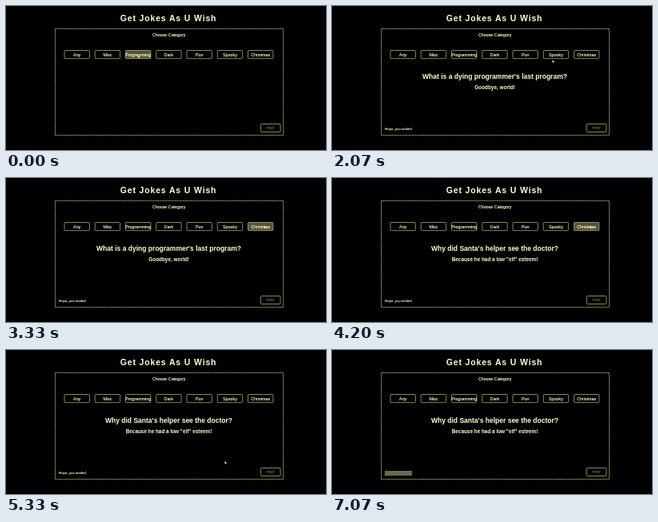
An HTML page for the animation above (7140 ms loop, 400 by 180 pixels).

```html
<!DOCTYPE html>
<html lang="en">
<head>
<meta charset="utf-8">
<title>Get Jokes As U Wish</title>
<style>
html, body { margin: 0; width: 100%; height: 100%; overflow: hidden; background: #000; }
svg { display: block; width: 400px; height: 180px; }
text { font: 5.33px "Liberation Sans", Arial, sans-serif; fill: #ffffd2; stroke: #ffffd2; stroke-width: .12; text-anchor: middle; }
.bold { font-weight: bold; stroke: none; }
#title { font-size: 10.5px; letter-spacing: .85px; text-anchor: start; }
#setup { font-size: 8.53px; }
#punch { font-size: 6.4px; }
#note { font-size: 4.35px; text-anchor: start; }
#post { font-size: 3.8px; fill: #b4b48c; stroke: none; }
.button { fill: #56523a; fill-opacity: 0; stroke: #b4b474; stroke-width: .75; }
</style>
</head>
<body>
<svg id="stage" viewBox="0 0 400 180">
  <defs>
    <pattern id="hatch" width="2" height="2" patternUnits="userSpaceOnUse">
      <path d="M0 0h1v1h1v1h-1v-1h-1z" fill="#d2d2a0"/>
    </pattern>
  </defs>
  <rect width="400" height="180"/>
  <text id="title" class="bold" x="142.7" y="19">Get Jokes As U Wish</text>
  <rect x="61.5" y="28.5" width="285" height="133" fill="none" stroke="#a8a872" stroke-dasharray="1.4 .7"/>
  <text x="203.7" y="38">Choose Category</text>
  <g id="buttons"></g>
  <rect class="button" x="318.4" y="147.5" width="24.6" height="10" rx="1"/>
  <text id="post" x="330.7" y="154">POST</text>
  <text id="setup" class="bold" x="203.5" y="91.3"></text>
  <text id="punch" class="bold" x="203.5" y="104.2"></text>
  <text id="note" x="66" y="155.2">Hope, you smiled</text>
  <rect id="selection" x="66" y="151" width="34" height="6" fill="url(#hatch)"/>
  <path id="cursor" d="M0 0v3.2l.8-.7.6 1.2.6-.3-.6-1.1h1.1z" fill="#fff"/>
</svg>
<script>
const LOOP = 7140, STEP = 1000 / 15;
const $ = id => document.getElementById(id);
const clamp = v => Math.max(0, Math.min(1, v));
const show = (id, on) => $(id).style.display = on ? '' : 'none';

$('buttons').innerHTML = ['Any', 'Misc', 'Programming', 'Dark', 'Pun', 'Spooky', 'Christmas']
  .map((name, i) => {
    const x = 73 + i * 38.25;
    return `<rect class="button" x="${x}" y="55.5" width="31.4" height="10.2" rx="1"/>` +
      `<text x="${x + 15.7}" y="62.6">${name}</text>`;
  }).join('');
const rects = $('buttons').querySelectorAll('rect');

const jokes = [
  ['', ''],
  ["What is a dying programmer's last program?", 'Goodbye, world!'],
  ["Why did Santa's helper see the doctor?", 'Because he had a low "elf" esteem!']
];

// time, x, y of the pointer tip
const path = [
  [0, 165, 61.5], [730, 165, 61.5], [930, 178.8, 70.3], [1450, 307, 102], [1560, 307, 102],
  [2030, 275.6, 67.6], [2230, 275.6, 67.6], [2700, 322.5, 59.5], [4230, 322.5, 59.5],
  [4470, 319, 68], [5130, 276, 135], [5300, 273.5, 139], [5400, 273.5, 139], [5850, 298, -7]
];

function pointer(t) {
  const i = path.findIndex(p => p[0] > t);
  if (i < 0) return path[path.length - 1].slice(1);
  const [t0, x0, y0] = path[i - 1], [t1, x1, y1] = path[i];
  const u = (t - t0) / (t1 - t0), e = u * u * (3 - 2 * u);
  return [x0 + (x1 - x0) * e, y0 + (y1 - y0) * e];
}

function draw(t) {
  const [setup, punch] = jokes[t < 400 ? 0 : t < 3600 ? 1 : 2];
  $('setup').textContent = setup;
  $('punch').textContent = punch;
  const selected = t >= 6700;
  show('note', t >= 400 && !selected);
  show('selection', selected);
  rects[2].style.fillOpacity = 1 - clamp((t - 900) / 250);
  rects[6].style.fillOpacity = clamp((t - 2450) / 250) - clamp((t - 4270) / 200);
  $('cursor').setAttribute('transform', `translate(${pointer(t)})`);
}

function frame() {
  const t = performance.now() % LOOP;
  draw(Math.floor(t / STEP + .1) * STEP);
  requestAnimationFrame(frame);
}
frame();
</script>
</body>
</html>
```
